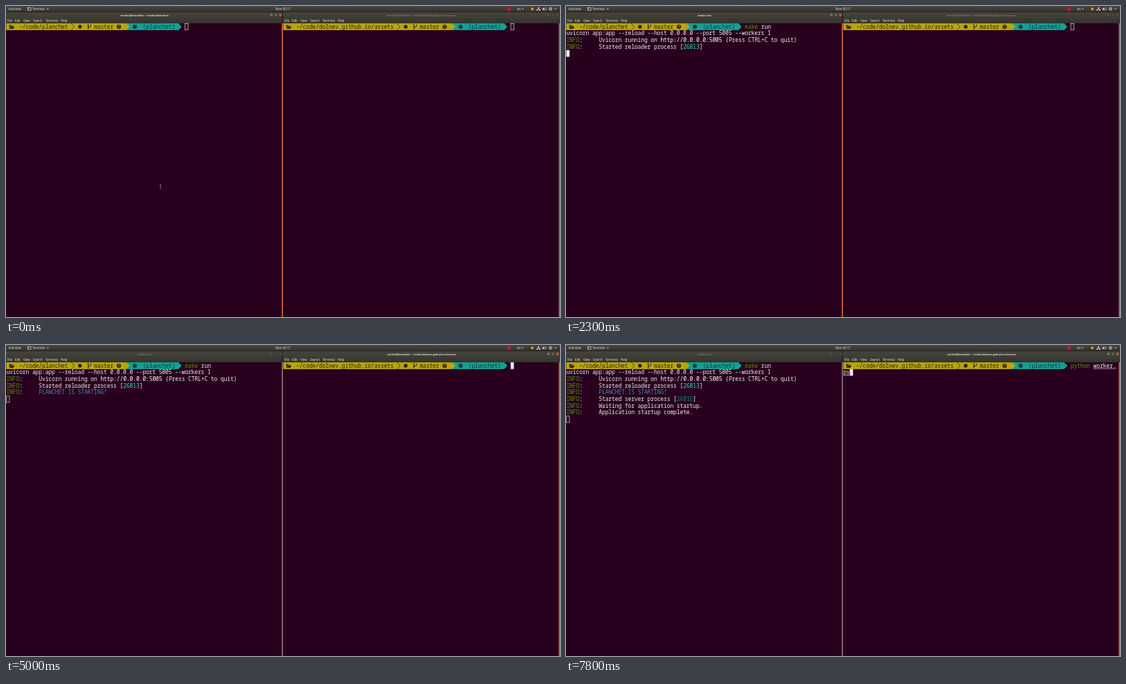
Animation, 800 px wide and 450 px high, one loop 8000 ms. Source, as an HTML page:

```html
<!DOCTYPE html>
<html lang="en">
<head>
<meta charset="utf-8">
<title>Two terminals</title>
<style>
html, body { margin: 0; width: 100%; height: 100%; overflow: hidden; background: #28001e; }
svg { display: block; width: 100vw; height: 100vh; }
text { white-space: pre; }
.mono { font: 8.1px "Noto Sans Mono", "DejaVu Sans Mono", monospace; letter-spacing: -0.17px; }
.ui { font: 500 4.4px "Noto Sans", "Open Sans", sans-serif; }
.title { font: 700 4.15px "Noto Sans", "Open Sans", sans-serif; }
</style>
</head>
<body>
<svg id="stage" viewBox="0 0 800 450">
  <defs>
    <linearGradient id="bar" x2="0" y2="1">
      <stop stop-color="#45443d"/><stop offset="1" stop-color="#35342f"/>
    </linearGradient>
  </defs>
  <g id="fixed"></g>
  <g id="live"></g>
</svg>
<script>
const LOOP = 8000, CW = 4.69, LH = 9.68, TOP = 25.1;
const PANES = [0.4, 400.4];
const C = {
  bg: '#28001e', white: '#eeeeec', green: '#4e9a06', red: '#cc2020', ghost: '#5b545a',
  yellow: '#b9a60b', teal: '#10a393', ink: '#2b2610', tealInk: '#093d38',
  cyan: '#34e2d2', dimCyan: '#0a8f95', blue: '#4f82aa', orange: '#e2683c',
  gray: '#8c8589', ui: '#dfdbd2', dim: '#7b7971'
};
const HOST = 'mirko@bramble: ';
const DIRS = ['~/code/planchet', '~/code/dolnev.github.io/assets'];

const rect = (x, y, w, h, fill, extra = '') =>
  `<rect x="${x}" y="${y}" width="${w}" height="${h}" fill="${fill}" ${extra}/>`;
const path = (d, fill, extra = '') => `<path d="${d}" fill="${fill}" ${extra}/>`;
const line = (d, stroke, width = 0.7) =>
  path(d, 'none', `stroke="${stroke}" stroke-width="${width}"`);
const circle = (x, y, r, fill, extra = '') =>
  `<circle cx="${x}" cy="${y}" r="${r}" fill="${fill}" ${extra}/>`;
const label = (x, y, str, cls, fill, extra = '') =>
  `<text x="${x}" y="${y}" class="${cls}" fill="${fill}" ${extra}>${str}</text>`;
const caret = (x, y) => path(`M${x - 1.4} ${y - 0.8}h2.8l-1.4 1.8z`, C.ui);

const colX = (pane, col) => PANES[pane] + col * CW;
const rowY = row => TOP + row * LH;
const run = (pane, row, col, str, fill, extra) =>
  label(colX(pane, col), rowY(row) + 7.6, str, 'mono', fill, extra);
const BOLD = 'font-weight="700"';

function prompt(pane) {
  const dir = DIRS[pane], end = 5 + dir.length;
  const X = col => colX(pane, col);
  const y = TOP, h = 9.8, mid = y + h / 2;
  const tip = (col, fill) => path(`M${X(col) - 0.2} ${y}h.2l${CW} ${h / 2}l${-CW} ${h / 2}h-.2z`, fill);
  const left = PANES[pane];
  const branch = X(end + 5) + 1;
  const help = X(end + 14) + 3.2;
  return rect(left, y, X(end + 17) - left, h, C.yellow)
    + rect(X(end + 17), y, X(end + 33) - X(end + 17), h, C.teal)
    + tip(end + 17, C.yellow) + tip(end + 33, C.teal)
    + path(`M${left + 4.3} 27.4h2.4l.8 1h3.2v1.1h-4.3l-2.1 3z`, C.ink)
    + path(`M${left + 6.4} 30h5.4l-1.6 3.1h-5.6z`, C.ink)
    + run(pane, 0, 4, dir, C.ink)
    + line(`M${X(end)} ${y}l${CW - 0.2} ${h / 2}l${1 - CW + 0.2 - 1} ${h / 2}`, C.ink, 0.7)
    + circle(X(end + 2) + 3.2, mid, 2.7, C.ink)
    + line(`M${branch} 26v8M${branch} 32.2q0-1.6 2.2-1.9q1.7-.3 1.7-2.6v-1`, C.ink, 1.1)
    + run(pane, 0, end + 7, 'master', C.ink)
    + circle(help, mid, 3.1, C.ink)
    + label(help, mid + 1.8, '?', 'title', C.yellow, 'text-anchor="middle" style="font-size:5px"')
    + circle(X(end + 19) + 2.8, mid, 3, C.tealInk)
    + run(pane, 0, end + 22, '(planchet)', C.tealInk);
}

function chrome() {
  let s = rect(0, 0, 800, 450, C.bg)
    + rect(0, 0, 800, 8.4, 'url(#bar)') + rect(0, 8.2, 800, 0.8, '#24231f')
    + rect(0, 9, 800, 16, 'url(#bar)')
    + rect(398, 9, 2, 16, '#2a2925')
    + label(3.8, 5.8, 'Activities', 'ui', C.ui, BOLD)
    + rect(31.2, 2.2, 4.8, 4, 'none', `stroke="${C.ui}" stroke-width=".7"`)
    + line('M32.2 3.3l1 .9l-1 .9', C.ui, 0.5)
    + label(38, 5.8, 'Terminal', 'ui', C.ui, BOLD) + caret(60.3, 4.2)
    + label(400, 5.8, 'Mon 00:17', 'ui', C.ui, BOLD + ' text-anchor="middle"')
    + circle(726.5, 4.2, 2.7, '#c0183c')
    + label(738, 5.8, 'en', 'ui', C.ui) + caret(746.2, 4.2)
    + circle(760, 4.2, 2, '#e29a1c')
    + rect(768, 2, 2, 1.7, C.ui) + rect(766.3, 5, 2, 1.7, C.ui) + rect(769.8, 5, 2, 1.7, C.ui)
    + line('M769 3.5v1M767.3 5v-.6h3.5v.6', C.ui, 0.5)
    + path('M774.5 3.4h1.2l1.6-1.5v4.8l-1.6-1.5h-1.2z', C.ui)
    + line('M778.3 2.7q1.4 1.5 0 3M779.4 2q2 2.3 0 4.4', C.ui, 0.5)
    + circle(786.3, 4.2, 1.6, 'none', `stroke="${C.ui}" stroke-width="1"`)
    + circle(786.3, 4.2, 2.3, 'none', `stroke="${C.ui}" stroke-width=".6" stroke-dasharray=".9 .9"`)
    + caret(793.5, 4.2);
  const menu = { File: 2, Edit: 13, View: 25, Search: 39, Terminal: 57, Help: 79 };
  for (const x of [0, 400])
    for (const name in menu) s += label(x + menu[name], 22.7, name, 'ui', C.ui);
  return s + prompt(0) + prompt(1);
}

function titleBar(pane, title, active) {
  const right = pane ? 796.3 : 396.2;
  const tone = active ? C.ui : C.dim;
  let s = label(pane ? 600 : 200, 14.5, title, 'title', tone, 'text-anchor="middle"');
  for (let i = 0; i < 3; i++) {
    const x = right - 6.5 * i, close = active && !i;
    s += circle(x, 13, 2.3, close ? C.orange : active ? '#85837a' : '#5b5a53',
      'stroke="#25241f" stroke-width=".5"');
    const mark = [`M${x - 0.9} 12.1l1.8 1.8m0-1.8l-1.8 1.8`, `M${x - 1} 12.1h2v1.8h-2z`, `M${x - 1} 13.3h2`][i];
    s += line(mark, '#2c2b27', 0.5);
  }
  return s + rect(pane ? 798.3 : 398.3, 25, 1.6, 425, active ? C.orange : '#89817f');
}

function cursor(pane, row, col, mode) {
  const x = colX(pane, col), y = rowY(row);
  if (mode === 'off') return '';
  if (mode === 'hollow')
    return rect(x + 0.3, y + 0.3, CW - 0.4, LH - 0.5, 'none', `stroke="${C.white}" stroke-width=".65"`);
  return rect(x, y, CW, LH, mode === 'ghost' ? C.gray : C.white);
}

const KEYS = [
  { pane: 0, col: 55, str: 'make run', word: 4, known: 1300,
    at: [900, 1000, 1100, 1200, 1500, 1600, 1700, 1800] },
  { pane: 1, col: 70, str: 'python worker.py', word: 6, known: 6000, under: true,
    at: [5100, 5400, 5500, 5600, 5800, 5900, 6200, 6300, ...Array(8).fill(6700)] }
];
const WRAP = 84;
const typed = (cmd, t) => cmd.at.filter(k => k <= t).length;
const place = (cmd, i) => {
  const c = cmd.col + i;
  return c < WRAP ? [0, c] : [1, c - WRAP];
};

// Typed part, then the grey suggestion for the rest
function command(cmd, t) {
  const n = typed(cmd, t);
  if (!n) return '';
  const part = (from, to, fill, under) => {
    let s = '';
    const split = Math.min(to, Math.max(from, WRAP - cmd.col));
    for (const [a, b] of [[from, split], [split, to]]) {
      if (b <= a) continue;
      const [row, col] = place(cmd, a);
      s += run(cmd.pane, row, col, cmd.str.slice(a, b), fill);
      if (under) s += rect(colX(cmd.pane, col), rowY(row) + 8.7, (b - a) * CW, 0.6, fill);
    }
    return s;
  };
  return part(0, Math.min(n, cmd.word), t >= cmd.known ? C.green : C.red)
    + part(cmd.word + 1, n, C.white, cmd.under)
    + part(Math.max(n, 0), n + 1, n < cmd.str.length ? '#d0cacd' : C.bg)
    + part(n + 1, cmd.str.length, C.ghost);
}

const LOG = [
  [2200, ['uvicorn app:app --reload --host 0.0.0.0 --port 5005 --workers 1', C.white]],
  [2300, ['Uvicorn running on ', C.white], ['http://0.0.0.0:5005', '#fff', BOLD], [' (Press CTRL+C to quit)', C.white]],
  [2300, ['Started reloader process [', C.white], ['26813', C.cyan, BOLD], [']', C.white]],
  [2900, ['PLANCHET IS STARTING!', C.blue]],
  [7400, ['Started server process [', C.white], ['26815', C.dimCyan], [']', C.white]],
  [7400, ['Waiting for application startup.', C.white]],
  [7400, ['Application startup complete.', C.white]]
];

function output(t) {
  let s = '';
  LOG.forEach(([at, ...parts], i) => {
    if (t < at) return;
    let col = 0;
    if (i) {
      s += run(0, i + 1, 0, 'INFO', C.green) + run(0, i + 1, 4, ':', C.white);
      col = 10;
    }
    for (const [str, fill, extra] of parts) {
      s += run(0, i + 1, col, str, fill, extra);
      col += str.length;
    }
  });
  return s;
}

function mouse(t) {
  if ((t >= 900 && t < 2700) || t >= 5000) return '';
  const p = Math.min(1, Math.max(0, (t - 2700) / 500));
  const e = p * p * (3 - 2 * p);
  const x = 223 + 295 * e, y = 261.3 - 8 * e;
  return line(`M${x - 1} ${y - 2.4}h2M${x} ${y - 2.4}v4.8M${x - 1} ${y + 2.4}h2`, '#b9b0b5', 0.6);
}

const BLINKS = [[700, 900], [3900, 4500], [7200, 7800]];

function cursors(t) {
  const focus = t < 100 ? -1 : t < 3300 ? 0 : 1;
  const blink = BLINKS.some(([a, b]) => t >= a && t < b);
  return KEYS.map((cmd, pane) => {
    const n = typed(cmd, t);
    const mode = focus !== pane ? 'hollow' : blink ? 'off'
      : n && n < cmd.str.length ? 'ghost' : 'solid';
    const lines = LOG.filter(l => l[0] <= t).length;
    const [row, col] = !pane && t >= 2100 ? [lines + 1, 0] : place(cmd, n);
    return cursor(pane, row, col, mode);
  }).join('');
}

function scene(t) {
  const second = t >= 3400;
  return titleBar(0, t < 2100 ? HOST + DIRS[0] : 'make run', !second)
    + titleBar(1, HOST + DIRS[1], second)
    + cursors(t) + KEYS.map(cmd => command(cmd, t)).join('') + output(t) + mouse(t);
}

const live = document.getElementById('live');
document.getElementById('fixed').innerHTML = chrome();
const start = performance.now();
let shown = -1;

function draw(now) {
  const t = Math.floor((Math.max(0, now - start) % LOOP) / 100) * 100;
  if (t !== shown) live.innerHTML = scene(shown = t);
  requestAnimationFrame(draw);
}
draw(start);
</script>
</body>
</html>
```
